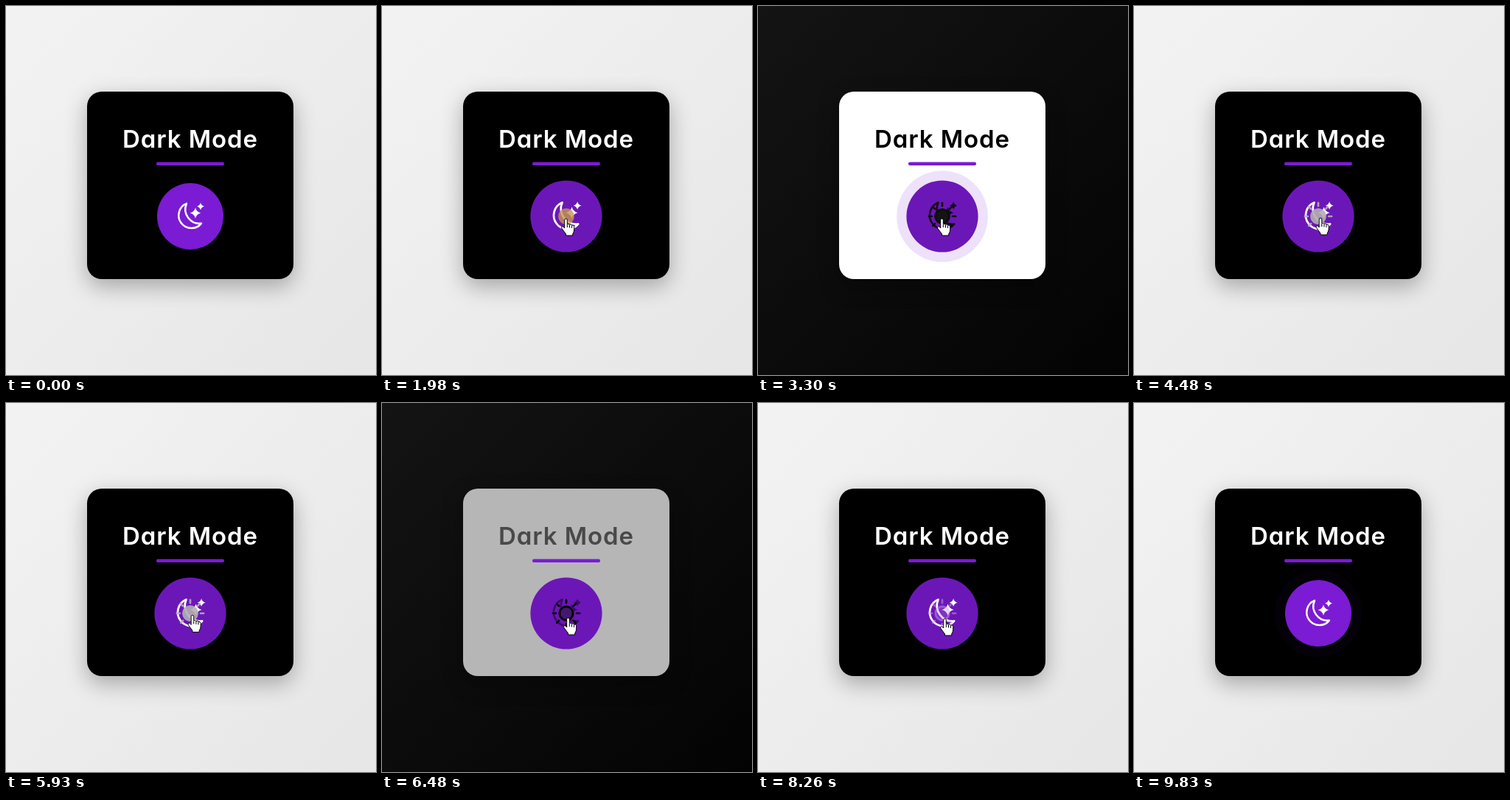
Animation, 502 px wide and 500 px high, one loop 9.9 s. Source, as an HTML page:

```html
<!DOCTYPE html>
<html lang="en">
<head>
<meta charset="utf-8">
<title>Dark Mode</title>
<style>
html, body { margin: 0; width: 100%; height: 100%; overflow: hidden; }
#page { position: relative; width: 502px; height: 500px; overflow: hidden;
  background: linear-gradient(135deg, #f3f3f3, #e6e6e6); }
#page.dark { background: linear-gradient(135deg, #141414, #030303); }
#card { position: absolute; left: 110px; top: 116px; width: 280px; height: 254px;
  border-radius: 20px; box-shadow: 0 10px 30px rgba(0, 0, 0, .3); }
svg { position: absolute; left: 0; top: 0; }
text { font: 600 33px Inter, "Open Sans", sans-serif; letter-spacing: .9px;
  font-feature-settings: "cv11"; }
.line { fill: none; stroke-width: 2.5; stroke-linecap: round; stroke-linejoin: round; }
</style>
</head>
<body>
<div id="page">
  <div id="card"></div>
  <svg width="502" height="500" viewBox="0 0 502 500">
    <text id="title" x="250" y="191.5" text-anchor="middle">Dark Mode</text>
    <rect x="204" y="211.5" width="92" height="4.5" rx="2" fill="#7b1bd3"/>
    <g id="button">
      <circle id="ring" fill="#7b1bd3"/>
      <circle id="face" r="45"/>
      <g id="moon">
        <path class="line" d="M-5-17.3A17.3 17.3 0 1 0 15 9.6A19.3 19.3 0 0 1-5-17.3z"/>
        <path id="stars" stroke="none"/>
      </g>
      <g id="sun">
        <circle id="disc" r="10" stroke="none"/>
        <circle class="line" r="8.4"/>
        <path id="rays" class="line"/>
      </g>
    </g>
    <g id="cursor" fill="#fff" stroke="#000" stroke-linejoin="round">
      <path id="arrow" d="M0 0V17l4-4 2.7 6 2.7-1.2-2.6-5.8h5.2z"/>
      <g id="hand">
        <path d="M-1.8 2a1.8 1.8 0 0 1 3.6 0V7.5q1.7-1 3.2.6 1.8-.8 3 .9 2.6-.6 3.2 1.8V15q0 3-2 6v2H0V21L-5.5 13.5q-1.4-2.4.8-2.8 1.6 0 2.9 2.3z"/>
        <path fill="none" d="M1.8 8v4M5 8.5v4M8 9.5v3.5"/>
      </g>
    </g>
  </svg>
</div>
<script>
const LOOP = 9900;
const $ = id => document.getElementById(id);
const el = Object.fromEntries(
  ['page', 'card', 'title', 'button', 'ring', 'face', 'moon', 'stars', 'sun', 'disc',
    'rays', 'cursor', 'arrow', 'hand'].map(id => [id, $(id)]));

const toggles = [2015, 3580, 6270, 7575];
const FADE = 500;
const pulse = { first: 500, period: 2080, grow: 1400, spread: 15, alpha: .7 };
const hover = { on: 1470, off: 8640, fade: 300, scale: .08 };

// time, x, y of the pointer tip
const path = [
  [1000, 387, 422], [1420, 254, 298], [1800, 249.5, 288], [3440, 249.5, 288],
  [4000, 253, 287], [5900, 253, 287], [6200, 252.5, 291], [7000, 252.5, 291],
  [7400, 253.5, 292], [8440, 253.5, 292], [8640, 282, 328], [9080, 395, 479]
];

// time, moon colour, moon alpha, sun colour, sun alpha, disc colour, disc alpha
const icons = [
  [0, '#fff', 1, 'none', 0, 'none', 0],
  [1970, '#fff', 1, 'none', 1, '#c8974f', .8],
  [2015, '#0c0c0c', .9, '#0c0c0c', 1, '#151515', 1],
  [3580, '#fff', 1, '#b5adb8', .9, '#b3b0b3', 1],
  [6270, '#1c0630', .6, '#000', 1, '#45186f', 1],
  [7575, '#fff', 1, '#c9a0ea', .5, '#b078dc', .6],
  [8640, '#fff', 1, 'none', 0, 'none', 0]
];

const clamp = v => Math.min(1, Math.max(0, v));
const mix = (a, b, p) => a + (b - a) * p;

// CSS "ease", cubic-bezier(.25, .1, .25, 1)
function ease(x) {
  x = clamp(x);
  let lo = 0, hi = 1;
  for (let i = 0; i < 24; i++) {
    const u = (lo + hi) / 2, v = 1 - u;
    if (.75 * v * v * u + .75 * v * u * u + u * u * u < x) lo = u; else hi = u;
  }
  const v = 1 - lo;
  return .3 * v * v * lo + 3 * v * lo * lo + lo ** 3;
}

function star(x, y, r) {
  const k = r * .2;
  return `M${x} ${y - r}Q${x + k} ${y - k} ${x + r} ${y}Q${x + k} ${y + k} ${x} ${y + r}` +
    `Q${x - k} ${y + k} ${x - r} ${y}Q${x - k} ${y - k} ${x} ${y - r}z`;
}

function ray(i) {
  const a = i * Math.PI / 4, c = Math.cos(a), s = Math.sin(a);
  return `M${13 * c} ${13 * s}L${16.8 * c} ${16.8 * s}`;
}

el.stars.setAttribute('d', star(7, -4.5, 7.3) + star(14, -13.5, 5));
el.rays.setAttribute('d', [...Array(8).keys()].map(ray).join(''));

function paint(node, colour, alpha) {
  node.setAttribute('stroke', colour);
  node.setAttribute('fill', colour);
  node.setAttribute('opacity', alpha);
}

function drawTheme(t) {
  const count = toggles.filter(c => t >= c).length;
  const dark = count % 2;
  const p = count ? ease((t - toggles[count - 1]) / FADE) : 1;
  const level = Math.round(255 * (dark ? p : 1 - p));
  const grey = v => `rgb(${v},${v},${v})`;
  el.page.className = dark ? 'dark' : '';
  el.card.style.background = grey(level);
  el.title.setAttribute('fill', grey(255 - level));
}

function drawButton(t) {
  const h = ease((t - hover.on) / hover.fade) - ease((t - hover.off) / hover.fade);
  el.button.setAttribute('transform', `translate(250 285) scale(${1 + hover.scale * h})`);
  el.face.setAttribute('fill',
    `rgb(${mix(123, 107, h)},${mix(27, 23, h)},${mix(211, 183, h)})`);

  const since = t - pulse.first;
  const p = since < 0 ? 1 : ease((since % pulse.period) / pulse.grow);
  el.ring.setAttribute('r', 45 + pulse.spread * p);
  el.ring.setAttribute('opacity', pulse.alpha * (1 - p));

  const [, moon, moonA, sun, sunA, disc, discA] = icons.findLast(s => t >= s[0]);
  paint(el.moon, moon, moonA);
  paint(el.sun, sun, sunA);
  el.disc.setAttribute('fill', disc);
  el.disc.setAttribute('opacity', discA);
}

function drawCursor(t) {
  const i = path.findIndex(s => s[0] > t);
  el.cursor.style.display = i > 0 ? '' : 'none';
  if (i < 1) return;
  const [t0, x0, y0] = path[i - 1], [t1, x1, y1] = path[i];
  const p = (t - t0) / (t1 - t0);
  const x = mix(x0, x1, p), y = mix(y0, y1, p);
  const over = Math.hypot(x - 250, y - 285) < 48;
  el.cursor.setAttribute('transform', `translate(${x} ${y})`);
  el.hand.style.display = over ? '' : 'none';
  el.arrow.style.display = over ? 'none' : '';
}

const start = performance.now();
function frame() {
  const t = (performance.now() - start) % LOOP;
  drawTheme(t);
  drawButton(t);
  drawCursor(t);
  requestAnimationFrame(frame);
}
frame();
</script>
</body>
</html>
```
